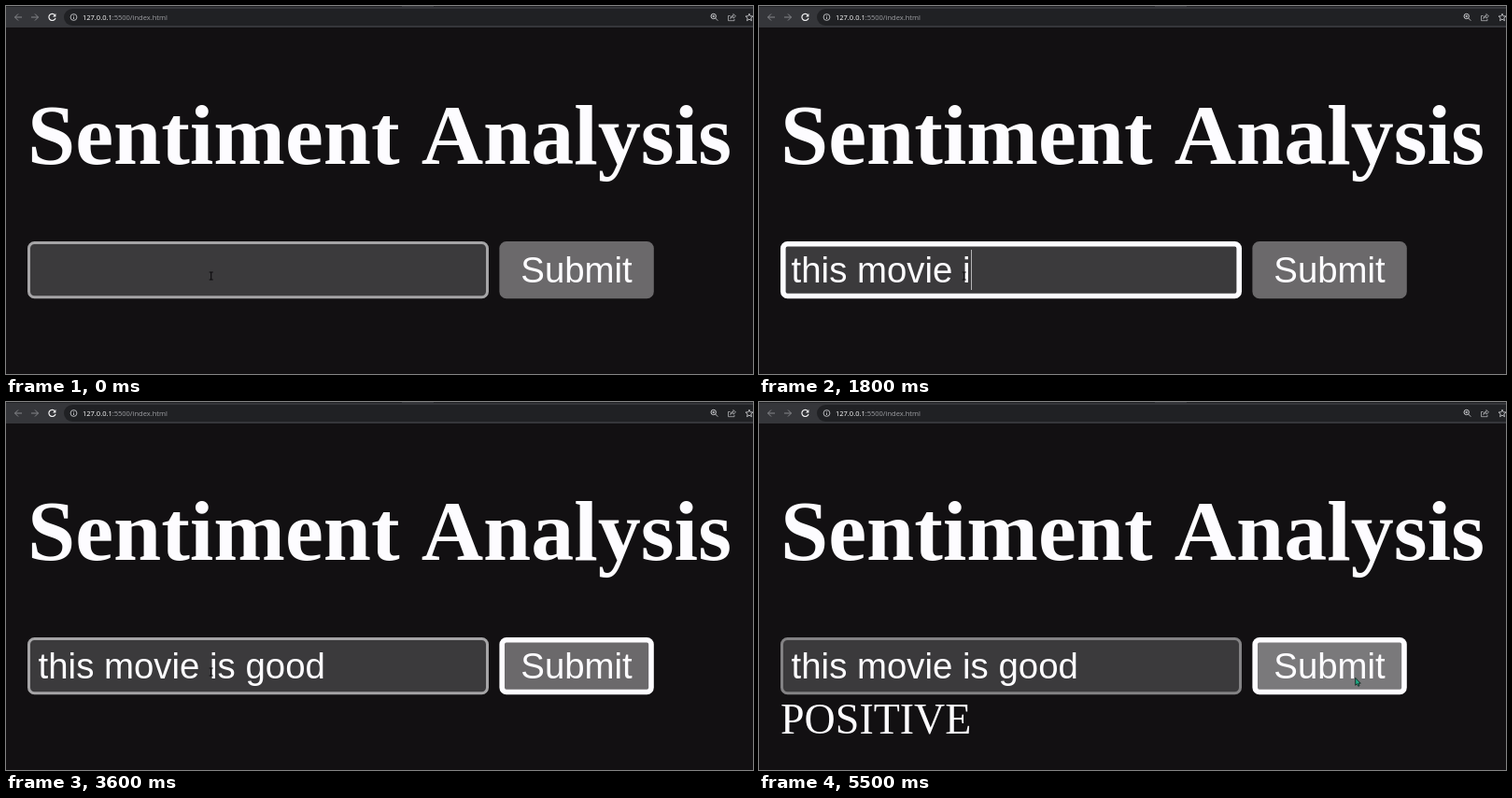
Write an HTML page that moves like this. It is 800 px wide and 394 px high and loops after 5600 ms.

```html
<!DOCTYPE html>
<html lang="en">
<head>
<meta charset="utf-8">
<title>Sentiment Analysis</title>
<style>
  html, body { margin: 0; width: 100%; height: 100%; overflow: hidden; background: #121012; }
  svg { display: block; width: 800px; height: 394px; }
  text { white-space: pre; font-kerning: none; }
  .serif { font-family: "Liberation Serif", "Times New Roman", serif; fill: #fdfcff; }
  .sans { font: 38.4px "Liberation Sans", Arial, sans-serif; font-kerning: none; fill: #fdfcff; }
  .url { font: 7.5px "Open Sans", sans-serif; fill: #fff; }
  .icon { fill: none; stroke: #c6c7ca; stroke-width: 1; }
</style>
</head>
<body>
<svg viewBox="0 0 800 394">
  <rect width="800" height="394" fill="#121012"/>

  <!-- browser bar -->
  <rect width="800" height="23" fill="#35363a"/>
  <rect width="800" height="1" fill="#202124"/>
  <rect x="424" width="34" height="1" fill="#35363a"/>
  <rect x="62" y="3" width="760" height="18" rx="9" fill="#202124"/>
  <g class="icon">
    <g stroke="#85868a">
      <path d="M17 12H9.5M13 8.5L9.5 12L13 15.5"/>
      <path d="M27 12H34.5M31 8.5L34.5 12L31 15.5"/>
    </g>
    <path d="M52.3 9.6A3.6 3.6 0 1 0 53 12.8" stroke="#f0f0f1" stroke-width="1.2"/>
    <path d="M53.4 8V11.4H50Z" fill="#f0f0f1" stroke="none"/>
    <circle cx="72.5" cy="12" r="3.4" stroke-width=".9"/>
    <path d="M72.5 11.6V14M72.5 9.8V10.6" stroke-width=".9"/>
    <circle cx="757.7" cy="11" r="2.7"/>
    <path d="M759.7 13L762.3 15.7M756.4 11H759M757.7 9.7V12.3" stroke-width=".9"/>
    <path d="M775.5 10.5H773.5V15.7H780V14M775.7 13.5Q776 10.3 779 10.3V8.5L781.5 11L779 13.2V11.7Q777 11.6 775.7 13.5Z" stroke-width=".7"/>
    <path d="M796 8.2L797.1 10.8L800 11L797.8 12.9L798.5 15.7L796 14.2L793.5 15.7L794.2 12.9L792 11L794.9 10.8Z" stroke-width=".9"/>
  </g>
  <text class="url" x="82" y="14.8">127.0.0.1<tspan fill="#9fa0a4">:5500/index.html</tspan></text>

  <!-- page -->
  <text class="serif" x="23" y="169" font-size="92" font-weight="bold">Sentiment Analysis</text>
  <rect id="field" fill="#3b3a3c"/>
  <text id="typed" class="sans" x="34.6" y="295.5"></text>
  <rect id="caret" y="261" width="1" height="43" fill="#b5b4b6"/>
  <rect id="button"/>
  <text class="sans" x="551.3" y="295.5">Submit</text>
  <text id="result" class="serif" x="23" y="355" font-size="46">POSITIVE</text>

  <!-- pointers -->
  <path id="beam" d="M-2 -4H2M0 -4V4M-2 4H2" fill="none" stroke="#0c0b0d" stroke-width="1.1"/>
  <path id="arrow" d="M0 0V8L1.8 6.5L3.1 9L4.4 8.4L3.2 5.9H5.6Z" fill="#20a883" stroke="#101b18" stroke-width=".8"/>
</svg>
<script>
const LOOP = 5600;
const PHRASE = "this movie is good";
const KEYS = [400, 500, 600, 800, 900, 1000, 1100, 1200, 1300, 1400, 1500,
              1800, 1900, 2000, 2100, 2200, 2300, 2500];
const FOCUS = 100, TAB = 3000, LEAVE = 3700, ARRIVE = 3800,
      PRESS = 4200, RELEASE = 4300, REPLY = 4600;
const TEXT_X = 34.6;

const el = id => document.getElementById(id);
const [field, typed, caret, button, result, beam, arrow] =
  ["field", "typed", "caret", "button", "result", "beam", "arrow"].map(el);

const show = (node, on) => node.setAttribute("visibility", on ? "visible" : "hidden");

function set(node, attrs) {
  for (const name in attrs) node.setAttribute(name, attrs[name]);
}

// Rounded box whose border stays inside its outer edge.
function box(node, x, width, border, color) {
  set(node, {
    x: x + border / 2, y: 252 + border / 2,
    width: width - border, height: 61.3 - border,
    rx: 7.5 - border / 2, stroke: color, "stroke-width": border
  });
}

function draw(now) {
  const t = now % LOOP;
  const inField = t >= FOCUS && t < TAB;
  const onButton = t >= ARRIVE;
  const count = KEYS.filter(k => k <= t).length;

  if (inField) box(field, 23, 494, 5.6, "#fdfcff");
  else box(field, 23, 494, 3, onButton ? "#838284" : "#a5a4a6");

  if (t >= TAB) box(button, 528.4, 165.4, 5.6, "#fdfcff");
  else box(button, 528.4, 165.4, 0, "none");
  const pressed = t >= PRESS && t < RELEASE;
  set(button, { fill: pressed ? "#605f61" : onButton ? "#7a797b" : "#6b696b" });

  const text = PHRASE.slice(0, count);
  if (typed.textContent !== text) typed.textContent = text;
  set(caret, { x: Math.round(TEXT_X + (count ? typed.getComputedTextLength() : 0)) });
  show(caret, inField);

  show(result, t >= REPLY);
  show(beam, !onButton);
  show(arrow, onButton);
  set(beam, { transform: t < LEAVE ? "translate(219.7 289)" : "translate(430 294)" });
  set(arrow, { transform: "translate(638.7 295.3)" });
}

const start = performance.now();
function tick() {
  draw(performance.now() - start);
  requestAnimationFrame(tick);
}
tick();
</script>
</body>
</html>
```
